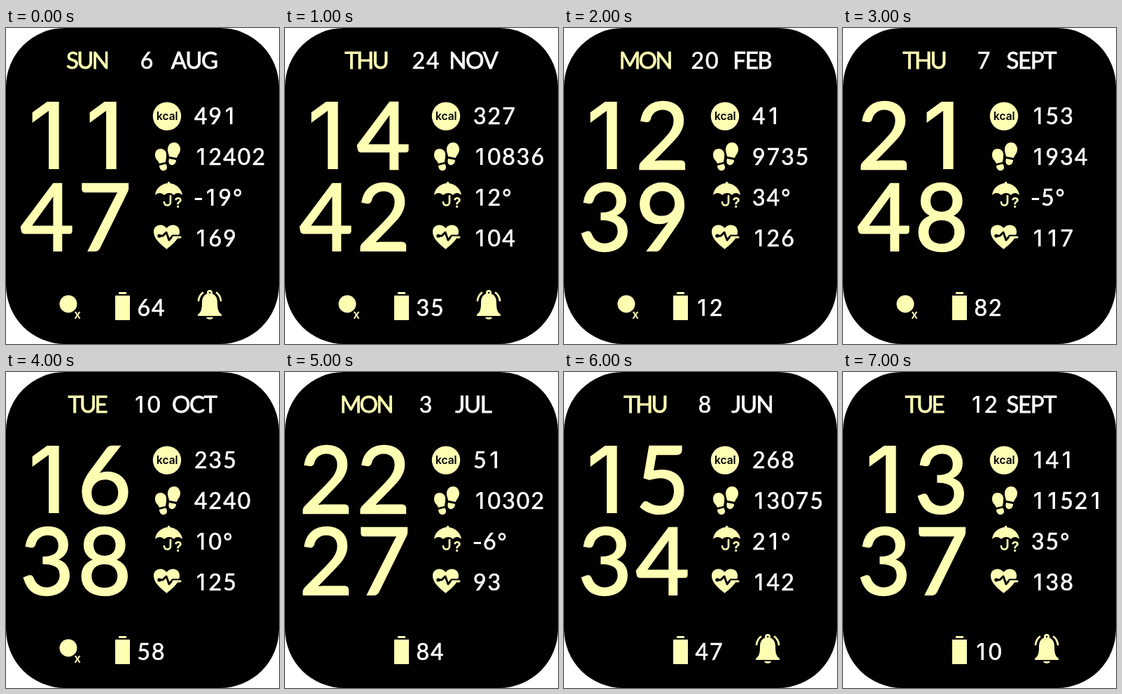
An HTML page with a canvas that plays this animation: 390 by 450 pixels, repeating every 8 s.

```html
<!DOCTYPE html>
<html lang="en">
<head>
<meta charset="utf-8">
<title>Watch face</title>
<style>
  html, body { margin: 0; width: 100%; height: 100%; overflow: hidden; background: #fff; }
  canvas { display: block; width: 390px; height: 450px; }
</style>
</head>
<body>
<canvas id="face" width="390" height="450"></canvas>
<script>
const ctx = document.getElementById('face').getContext('2d');
const CREAM = '#ffffb4', WHITE = '#fff', BLACK = '#000';
const STEP = 1000;

const row = (weekday, day, month, hours, minutes, kcal, steps, temp, pulse, battery, unlinked, alarm) =>
  ({ weekday, day, month, hours, minutes, kcal, steps, temp, pulse, battery, unlinked, alarm });

const states = [
  row('SUN', '6', 'AUG', '11', '47', '491', '12402', '-19°', '169', '64', true, true),
  row('THU', '24', 'NOV', '14', '42', '327', '10836', '12°', '104', '35', true, true),
  row('MON', '20', 'FEB', '12', '39', '41', '9735', '34°', '126', '12', true, false),
  row('THU', '7', 'SEPT', '21', '48', '153', '1934', '-5°', '117', '82', true, false),
  row('TUE', '10', 'OCT', '16', '38', '235', '4240', '10°', '125', '58', true, false),
  row('MON', '3', 'JUL', '22', '27', '51', '10302', '-6°', '93', '84', false, false),
  row('THU', '8', 'JUN', '15', '34', '268', '13075', '21°', '142', '47', false, true),
  row('TUE', '12', 'SEPT', '13', '37', '141', '11521', '35°', '138', '10', false, true)
];

// "bold" is the width of an outline that thickens the letters.
function text(str, x, y, font, color, bold = 0, spacing = 0) {
  ctx.font = font;
  ctx.fillStyle = ctx.strokeStyle = color;
  ctx.textAlign = 'center';
  ctx.letterSpacing = spacing + 'px';
  ctx.fillText(str, x + spacing / 2, y);
  if (!bold) return;
  ctx.lineWidth = bold;
  ctx.lineJoin = 'miter';
  ctx.strokeText(str, x + spacing / 2, y);
}

// Tabular figures: each character is centred in its own cell.
// Inter supplies the footless 1 and the signs, Lato the other digits.
function figures(str, x, y, size = 32, pitch = 20.6, color = WHITE) {
  for (const ch of str) {
    const cell = ch === '-' ? 14 : ch === '°' ? 15 : pitch;
    if (/[02-9]/.test(ch)) text(ch, x + cell / 2, y, `${size}px Lato, sans-serif`, color, size * 0.02);
    else text(ch, x + cell / 2, y, `500 ${size}px Inter, sans-serif`, color);
    x += cell;
  }
}

const label = (str, x, color, spacing) =>
  text(str, x, 58, '33px Lato, sans-serif', color, 0.8, spacing);

function fill(d, color = CREAM) {
  ctx.fillStyle = color;
  ctx.fill(new Path2D(d));
}

function line(d, width, color = CREAM) {
  ctx.strokeStyle = color;
  ctx.lineWidth = width;
  ctx.lineCap = ctx.lineJoin = 'round';
  ctx.stroke(new Path2D(d));
}

function disc(x, y, r, color = CREAM) {
  ctx.fillStyle = color;
  ctx.beginPath();
  ctx.arc(x, y, r, 0, Math.PI * 2);
  ctx.fill();
}

function energyIcon() {
  disc(230, 125.6, 20.2);
  text('kcal', 230.3, 131, '600 15.5px Inter, sans-serif', BLACK);
}

function stepsIcon() {
  fill('M213 181C213 175 216 172 221 172C227 172 230 177 229 183C229 186 228 189 228 191L219 193C217 188 213 187 213 181Z');
  fill('M219 196L228 193.500C231 197 231 202 226 203C222 204 219 200 219 196Z');
  fill('M231 173C231 167 235 163 240 163C246 163 249 168 249 173C249 178 245 181 244 185L233 183C233 180 231 178 231 173Z');
  fill('M233 186L243 188C243 193 239 196 236 195C232 194 232 190 233 186Z');
}

function umbrellaIcon() {
  fill('M213 238C214 228 222 222 231 221V219H234V221C243 222 251 229 252 238C248 234 243 234 240 238C236 234 230 234 226 238C222 234 217 234 213 238Z');
  line('M235 239V248C235 254 226 254 226 248', 2.7);
  text('?', 246, 256, '700 20px Inter, sans-serif', CREAM);
}

function heartIcon() {
  fill('M229.500 315C220 307 211 300 211 290C211 280 223 277 229.500 285C236 277 248 280 248 290C248 300 239 307 229.500 315Z');
  line('M218 296H224L229 291L233 302L238 296H250', 3, BLACK);
  disc(219, 296, 2.6, BLACK);
  line('M239 298H249', 3);
}

function linkIcon() {
  disc(89, 393, 12.5);
  text('x', 102, 414, '600 17px Inter, sans-serif', CREAM);
}

function batteryIcon() {
  fill('M161 379V377Q161 376 162 376H171Q172 376 172 377V379Z');
  fill('M156 381H177V416H156Z');
}

function bellIcon() {
  disc(291, 377, 4);
  fill('M291 378C299 378 302 384 302 391C302 402 304 405 308 408V410H274V408C278 405 280 402 280 391C280 384 283 378 291 378Z');
  disc(291, 377, 1.3, BLACK);
  fill('M286 412H296C295 416 287 416 286 412Z');
  line('M275 388Q276 381 281 377M307 388Q306 381 301 377', 2.8);
}

function draw(s) {
  ctx.fillStyle = WHITE;
  ctx.fillRect(0, 0, 390, 450);
  ctx.fillStyle = BLACK;
  ctx.beginPath();
  ctx.roundRect(0, 0, 390, 450, 84);
  ctx.fill();

  label(s.weekday, 117, CREAM, -2.8);
  figures(s.day, 201 - s.day.length * 10.3, 58);
  label(s.month, 269.5, WHITE, -1.4);

  figures(s.hours, 17.8, 200.7, 132, 82, CREAM);
  figures(s.minutes, 17.8, 316.7, 132, 82, CREAM);

  energyIcon();
  stepsIcon();
  umbrellaIcon();
  heartIcon();
  [s.kcal, s.steps, s.temp, s.pulse].forEach((value, i) => figures(value, 268, 137 + i * 58));

  if (s.unlinked) linkIcon();
  batteryIcon();
  figures(s.battery, 186.5, 410);
  if (s.alarm) bellIcon();
}

const start = performance.now();
function tick() {
  const elapsed = performance.now() - start;
  draw(states[Math.floor(elapsed / STEP) % states.length]);
  requestAnimationFrame(tick);
}
tick();
</script>
</body>
</html>
```
